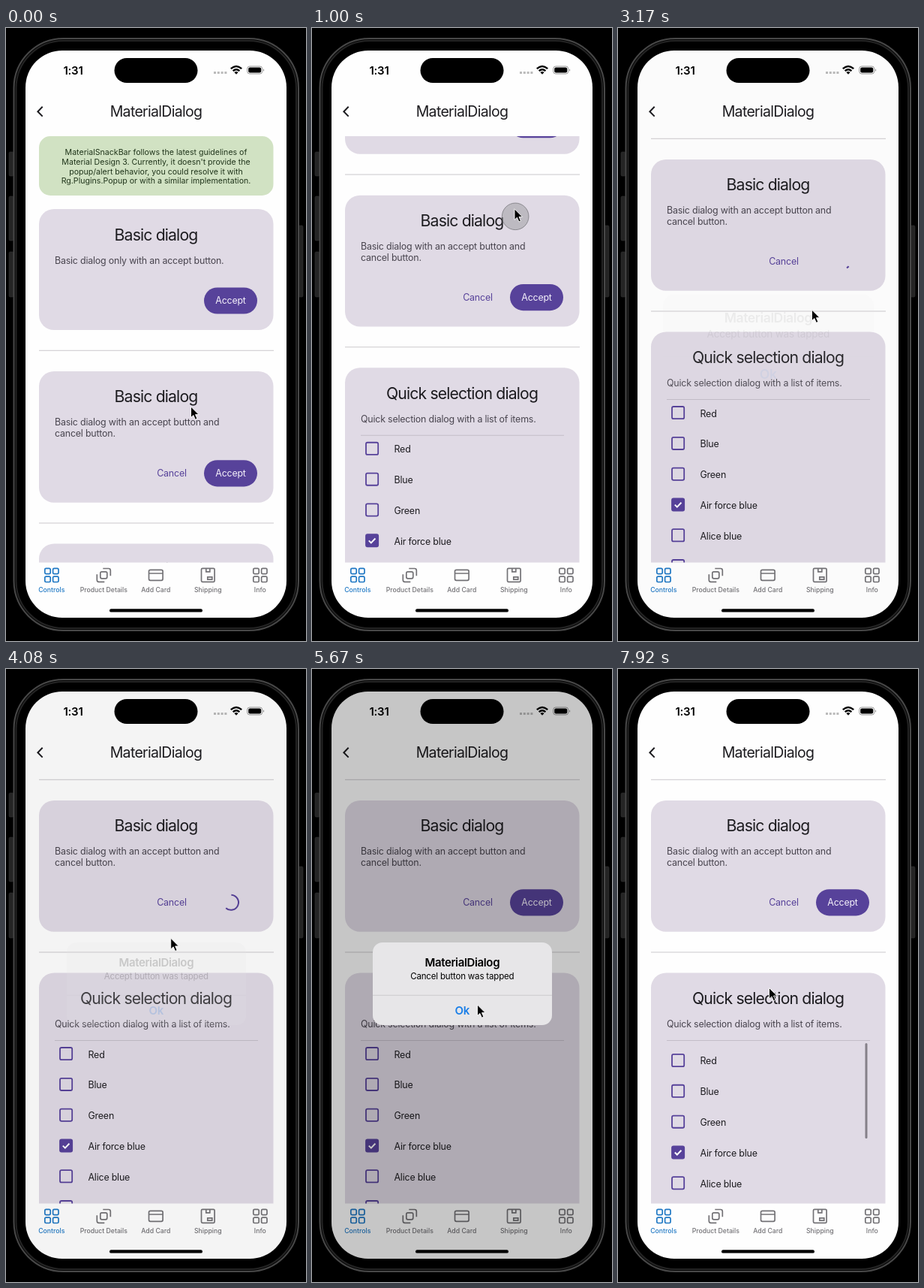
These frames come from a looping animation (400x816 px, 8 s). An HTML page:

```html
<!DOCTYPE html>
<html lang="en">
<head>
<meta charset="utf-8">
<title>MaterialDialog</title>
<style>
  html, body { margin: 0; width: 100%; height: 100%; overflow: hidden; background: #000; }
  svg { display: block; width: 400px; height: 816px; font-family: Inter, Roboto, sans-serif; }
</style>
</head>
<body>
<svg id="stage" viewBox="0 0 400 816"></svg>
<script>
const LOOP = 8000;
const PURPLE = '#57429a', CARD = '#e0dae5', INK = '#1c1b1f', SOFT = '#49454f', GREY = '#737276', BLUE = '#1f78c4';
const ROW = 40.8;
const COLOURS = ['Red', 'Blue', 'Green', 'Air force blue', 'Alice blue', 'Alizarin', 'Almond', 'Amber', 'American rose', 'Amethyst'];

// y is the middle of the capitals
const text = (x, y, str, size, { fill = INK, anchor = 'start', weight = 400, track = -0.015, id = '' } = {}) =>
  `<text ${id && `id="${id}"`} x="${x}" y="${(y + size * 0.36).toFixed(2)}" font-size="${size}" fill="${fill}"
    text-anchor="${anchor}" font-weight="${weight}" letter-spacing="${track}em">${str}</text>`;
const middle = (x, y, str, size, opts) => text(x, y, str, size, { anchor: 'middle', ...opts });
const rect = (x, y, w, h, r, attrs) => `<rect x="${x}" y="${y}" width="${w}" height="${h}" rx="${r}" ${attrs}/>`;
const rule = (x1, x2, y, colour = '#cbc8cc') => `<path d="M${x1} ${y}H${x2}" stroke="${colour}"/>`;
const heading = (y, str) => middle(200, y, str, 21.2, { track: -0.04 });
const body = (y, str) => text(65, y, str, 12.4, { fill: SOFT });
const accept = (y, id) => `<g id="${id}">${rect(264, y - 17.6, 71, 35.2, 17.6, `fill="${PURPLE}"`)}
  ${middle(299.5, y, 'Accept', 12.4, { fill: '#f4f0fa' })}</g>`;
const card = (y, h) => rect(44, y, 312.5, h, 20, `fill="${CARD}"`);

const listRow = (name, i) => {
  const y = 794.5 + i * ROW, on = i === 3;
  return rect(72, y - 8.5, 16.2, 16.2, 2, `fill="${on ? PURPLE : 'none'}" stroke="${PURPLE}" stroke-width="1.8"`) +
    (on ? `<path d="M75.8 ${y - 0.3}l3 3 5.6-5.8" fill="none" stroke="#fff" stroke-width="2"/>` : '') +
    text(109.5, y + 0.6, name, 12.4);
};

const notice = ['MaterialSnackBar follows the latest guidelines of',
  "Material Design 3. Currently, it doesn't provide the",
  'popup/alert behavior, you could resolve it with',
  'Rg.Plugins.Popup or with a similar implementation.'];

const page = `
  ${rect(44, 144, 312.5, 79, 15, 'fill="#d1e2c3"')}
  ${notice.map((s, i) => middle(200, 165.3 + i * 12.7, s, 10.6, { fill: '#20351b', track: 0 })).join('')}
  ${card(241, 161)}${heading(275.5, 'Basic dialog')}
  ${body(309.7, 'Basic dialog only with an accept button.')}${accept(363, 'first')}
  ${rule(44, 357, 429.3)}
  ${card(457, 174.8)}${heading(490.8, 'Basic dialog')}
  ${body(524.5, 'Basic dialog with an accept button and')}${body(539.5, 'cancel button.')}
  ${middle(221, 592.8, 'Cancel', 12.4, { fill: PURPLE })}${accept(592.8, 'accept')}
  <path id="spinner" fill="none" stroke="${PURPLE}" stroke-width="2"/>
  ${rule(44, 357, 659)}
  ${card(686.5, 400)}${heading(720.5, 'Quick selection dialog')}
  ${body(754.3, 'Quick selection dialog with a list of items.')}
  <g clip-path="url(#listClip)"><g id="list">${COLOURS.map(listRow).join('')}</g>
    <rect id="bar" x="329.5" width="3" rx="1.5" fill="#858089"/></g>
  ${rule(65, 336, 776.5, '#c3bdc8')}`;

const grid = [[-9, -9], [1.8, -9], [-9, 1.8], [1.8, 1.8]].map(([x, y]) => rect(x, y, 7.4, 7.4, 1.6, '')).join('');
const tabs = [
  ['Controls', grid],
  ['Product Details', rect(-4.5, -4.5, 9, 9, 2, '') +
    '<path d="M-1-8.8H6.5Q9-8.8 9-6.3V1M1 9H-6.5Q-9 9-9 6.5V-1"/>'],
  ['Add Card', rect(-9.3, -7, 18.6, 14, 2, '') + '<path d="M-9-2.3H9"/>'],
  ['Shipping', rect(-8.8, -9, 17.6, 18, 1.5, '') + '<path d="M-2.5-9v4.5h5V-9M-.5 2.5h6v3.4h-6z"/>'],
  ['Info', grid],
].map(([label, icon], i) => {
  const x = 60.8 + i * 69.5, c = i ? GREY : BLUE;
  return `<g transform="translate(${x} 728.3)" fill="none" stroke="${c}" stroke-width="1.7">${icon}</g>` +
    middle(x, 748.3, label, 8.7, { fill: c, weight: 500, track: 0 });
}).join('');

const status = `
  ${middle(89.5, 56.2, '1:31', 15, { weight: 600, fill: '#000' })}
  <path d="M277 59.5h18" stroke="#bbb" stroke-width="3" stroke-dasharray="3 1.8"/>
  <g fill="none" stroke="#000" stroke-width="2.3">
    <path d="M299.8 54.2Q307 47.8 314.2 54.2M302.6 57.2Q307 53.2 311.4 57.2"/></g>
  <path d="M304.4 59Q307 56.8 309.6 59L307 61.8z"/>
  ${rect(321.7, 51, 20, 10, 3.2, 'fill="none" stroke="#000" stroke-opacity=".4"')}
  ${rect(323.2, 52.5, 17, 7, 2, '')}
  <path d="M343.2 54.2q2 1.8 0 3.6z" opacity=".5"/>`;

const alertBox = `<g id="alert">
  ${rect(81, 364, 239, 110, 13, 'fill="#e7e6e8"')}
  ${middle(200.3, 390.3, 'MaterialDialog', 15, { weight: 600, fill: '#000', track: -0.024 })}
  ${middle(200.3, 409.3, '', 11.5, { fill: '#000', id: 'message' })}
  ${rule(81, 320, 434.3, '#cccbcd')}
  ${middle(200.3, 454.3, 'Ok', 15, { weight: 600, fill: '#1a7fe8' })}</g>`;

const sideButtons = [[4, 165, 32], [4, 224, 59], [4, 298, 60], [390, 263, 95]]
  .map(([x, y, h]) => rect(x, y, 6, h, 1.5, 'fill="#252525" stroke="#333" stroke-width=".6"')).join('');

stage.innerHTML = `
  <defs>
    <clipPath id="screenClip">${rect(26, 30, 348, 755, 49, '')}</clipPath>
    <clipPath id="pageClip">${rect(26, 144, 348, 567.5, 0, '')}</clipPath>
    <clipPath id="listClip">${rect(44, 776.5, 313, 278, 0, '')}</clipPath>
  </defs>
  ${sideButtons}
  ${rect(10.5, 14, 379.5, 788, 66, 'fill="#050505" stroke="#484848" stroke-width="2"')}
  ${rect(13.5, 17, 373.5, 782, 63, 'fill="#000" stroke="#242424" stroke-width="2"')}
  <g clip-path="url(#screenClip)">
    ${rect(26, 30, 348, 755, 0, 'fill="#fefefe"')}
    <g clip-path="url(#pageClip)"><g id="page">${page}</g></g>
    ${middle(200, 111, 'MaterialDialog', 19.5, { track: -0.035 })}
    <path d="M48.7 104.8l-6.3 6.4 6.3 6.4" fill="none" stroke="#1c1b1f" stroke-width="2"/>
    ${tabs}${status}
    ${rect(26, 30, 348, 755, 0, 'id="dim"')}
    ${rect(138, 773.2, 124, 4.4, 2.2, '')}
    ${alertBox}
  </g>
  ${rect(144.5, 40, 111, 33, 16.5, '')}
  <circle id="touch" r="17.8" fill="#8c8c90" fill-opacity=".42" stroke="#6e6e72" stroke-opacity=".7"/>
  <path id="pointer" d="M0 0V14.6L3.4 11.5 5.9 17.2 8.4 16.1 6 10.6H10.6Z" stroke="#fff" stroke-width="1" stroke-opacity=".9"/>`;

// steps: [time, value]
const pageScroll = [[250, 0], [1000, 234], [1120, 257], [1650, 282]];
const listScroll = [[6400, 0], [6750, 143.5], [6850, 155], [7080, 158], [7450, 50], [7700, -16], [7800, -17], [7920, -9], [8000, -5]];
const pointerX = [[0, 246.5], [250, 258], [1000, 270], [1300, 272], [1900, 300], [2300, 300], [3170, 258.5], [3600, 220], [4080, 219.7],
  [4500, 222], [5000, 222], [5400, 220.5], [5950, 220.5], [6350, 240], [6750, 242], [7050, 225], [7500, 203], [7920, 201.5]];
const pointerY = [[0, 504], [250, 496], [1000, 241], [1120, 219], [1350, 225], [1900, 310], [2300, 310], [3170, 375], [3550, 452], [3800, 452],
  [4080, 358.5], [4500, 309], [4950, 309], [5400, 447], [6000, 447], [6350, 510], [6750, 353], [6850, 340], [7050, 332], [7450, 440], [7920, 424.5]];
const touches = [[250, 1120], [2100, 2230], [3720, 3820], [4800, 4900], [5930, 6030], [6370, 6870], [7070, 7480]];
const alerts = [[3155, 3420, 3850, 4130, 'Accept'], [4980, 5240, 6050, 6330, 'Cancel']];
const BUSY = [2230, 4200];

// smooth interpolation without overshoot
function at(keys, t) {
  const last = keys.length - 1;
  if (t <= keys[0][0]) return keys[0][1];
  if (t >= keys[last][0]) return keys[last][1];
  const i = keys.findIndex(k => k[0] > t) - 1;
  const slope = j => j < 0 || j >= last ? 0 : (keys[j + 1][1] - keys[j][1]) / (keys[j + 1][0] - keys[j][0]);
  const tangent = j => {
    const a = slope(j - 1), b = slope(j);
    return a * b <= 0 ? 0 : 2 * a * b / (a + b);
  };
  const [t0, v0] = keys[i], [t1, v1] = keys[i + 1], h = t1 - t0, u = (t - t0) / h;
  return v0 + (v1 - v0) * u * u * (3 - 2 * u) + h * u * (1 - u) * (tangent(i) * (1 - u) - tangent(i + 1) * u);
}
const ramp = (t, a, b) => Math.min(1, Math.max(0, (t - a) / (b - a)));
const el = id => document.getElementById(id);
const set = (id, attrs) => Object.entries(attrs).forEach(([k, v]) => el(id).setAttribute(k, v));

function spinnerArc(t) {
  const tail = 40 + 0.255 * (t - 3170);
  const sweep = 20 + 285 * Math.sin(Math.PI * (t - 3170) / 1333) ** 2;
  const point = deg => `${300 + 10 * Math.cos(deg * Math.PI / 180)} ${592.8 + 10 * Math.sin(deg * Math.PI / 180)}`;
  return `M${point(tail)}A10 10 0 ${sweep > 180 ? 1 : 0} 1 ${point(tail + sweep)}`;
}

function draw(t) {
  set('page', { transform: `translate(0 ${-at(pageScroll, t)})` });

  const offset = at(listScroll, t), barEnd = Math.min(0, offset);
  set('list', { transform: `translate(0 ${-offset})` });
  set('bar', { y: 780 + Math.max(0, offset) * 0.49, height: 136 + barEnd, opacity: ramp(t, 6400, 6500) });

  const busy = t >= BUSY[0] && t < BUSY[1];
  set('accept', { opacity: busy ? 0 : 1 });
  set('spinner', { d: busy ? spinnerArc(t) : '' });

  const [a, b, c, d, name] = alerts[t < 4500 ? 0 : 1];
  const enter = ramp(t, a, b), shown = enter * (1 - ramp(t, c, d));
  const scale = 1 + 0.2 * (1 - enter) ** 2;
  el('message').textContent = `${name} button was tapped`;
  set('alert', { opacity: shown, transform: `translate(200.3 419) scale(${scale}) translate(-200.3 -419)` });
  set('dim', { opacity: shown * 0.22 });

  const down = touches.some(([from, to]) => t >= from && t < to);
  set('touch', { cx: at(pointerX, t - 35) + 1.5, cy: at(pointerY, t - 35) + 1, opacity: down ? 1 : 0 });
  set('pointer', { transform: `translate(${at(pointerX, t)} ${at(pointerY, t)})` });
}

const start = performance.now();
function tick() {
  draw((performance.now() - start) % LOOP);
  requestAnimationFrame(tick);
}
tick();
</script>
</body>
</html>
```
